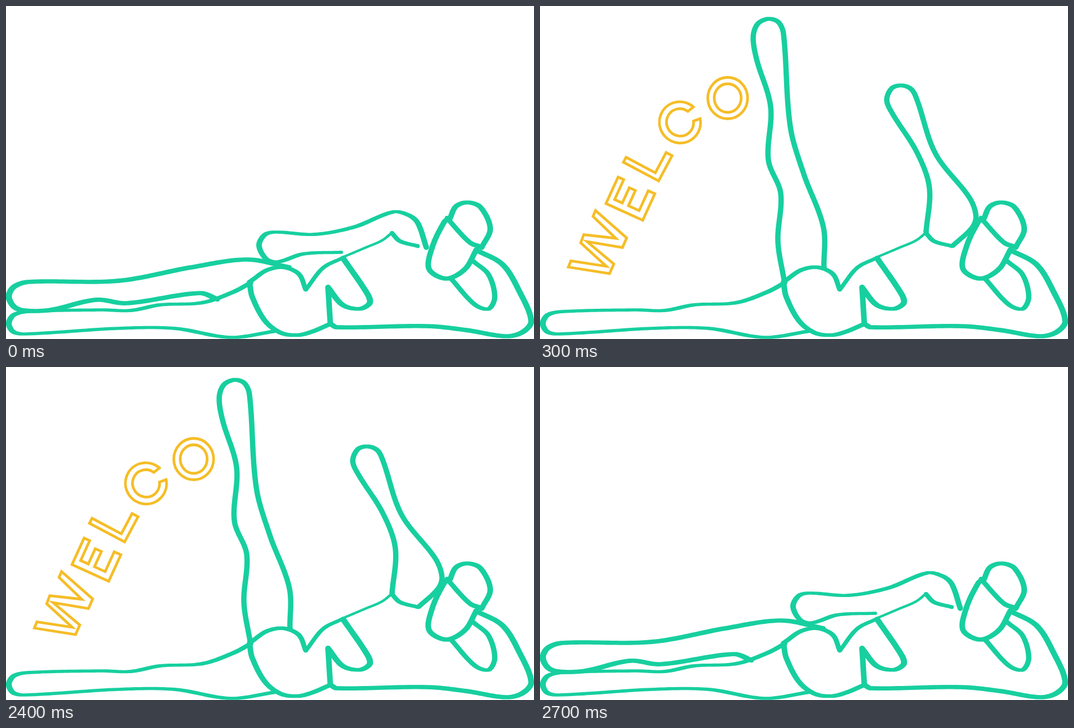
Animation of 941x595 px, one loop 3.7 s. Source, as an HTML page with a canvas:

```html
<!DOCTYPE html>
<html lang="en">
<head>
<meta charset="utf-8">
<title>Welcome</title>
<style>
html, body { margin: 0; width: 100%; height: 100%; overflow: hidden; background: #fff; }
canvas { display: block; }
</style>
</head>
<body>
<canvas id="stage" width="941" height="595" role="img" aria-label="WELCOME!"></canvas>
<script>
const ctx = document.getElementById('stage').getContext('2d');
const GREEN = '#17cf9f', YELLOW = '#f5bd27';

// Smooth curve through a few points, drawn with a flat nib:
// `thin` wide where the line runs level, `thick` where it runs upright.
function brush(thin, thick, text) {
  const points = text.split(' ').map(p => p.split(',').map(Number));
  const at = i => points[Math.max(0, Math.min(points.length - 1, i))];
  const dist = (p, q) => Math.hypot(q[0] - p[0], q[1] - p[1]);
  const tangent = i => {
    const before = at(i - 1), after = at(i + 1);
    const length = dist(before, at(i)) + dist(at(i), after);
    return [0, 1].map(k => (after[k] - before[k]) / length);
  };
  const line = [];
  for (let i = 0; i < points.length - 1; i++) {
    const p = at(i), q = at(i + 1), m = tangent(i), n = tangent(i + 1), length = dist(p, q);
    for (let s = 0; s < 20; s++) {
      const t = s / 20, u = 1 - t;
      line.push([0, 1].map(k =>
        p[k] * u * u * (1 + 2 * t) + q[k] * t * t * (3 - 2 * t) + length * t * u * (m[k] * u - n[k] * t)));
    }
  }
  line.push(at(points.length));

  const left = [], right = [], shape = new Path2D(), ends = new Path2D();
  const last = line.length - 1;
  line.forEach(([x, y], i) => {
    const p = line[Math.max(0, i - 1)], q = line[Math.min(last, i + 1)];
    const angle = Math.atan2(q[1] - p[1], q[0] - p[0]);
    const r = (thin + (thick - thin) * Math.abs(Math.sin(angle))) / 2;
    const dx = -Math.sin(angle) * r, dy = Math.cos(angle) * r;
    left.push([x + dx, y + dy]);
    right.unshift([x - dx, y - dy]);
    if (i === 0 || i === last) {
      ends.moveTo(x + r, y);
      ends.arc(x, y, r, 0, 7);
    }
  });
  left.concat(right).forEach(p => shape.lineTo(...p));
  return [shape, ends];
}

const restingLeg = brush(5.5, 10.5, '437,494 405,511 350,530 275,534 222,544 170,543 40,546 14,552 5,567 13,582 35,586 200,576 300,576 400,592 480,581');
const torso = [
  brush(6.5, 10, '434,494 439,520 462,563 490,584 520,588 545,582 576,569'),
  brush(6.5, 9, '437,491 465,472 495,467 522,479 534,506'),
  brush(5.5, 8, '535,506 565,468 600,450'),
  brush(6.5, 11, '601,451 645,516 648,531 630,541 600,534 574,503'),
  brush(9, 10, '574,503 578,568'),
  brush(7.5, 10.5, '578,568 590,574 750,572 820,579 890,590 920,583 936,563 915,510 885,462 838,436'),
  brush(4, 5, '600,449 640,432 670,419 688,405'),
  brush(6, 9, '688,406 702,420 734,429')
];
const head = [
  brush(7.5, 10, '789,380 781,386 760,430 754,470 785,487 818,470 838,436'),
  brush(8, 9, '786,379 826,422 848,431'),
  brush(7, 10, '791,380 802,358 823,351 846,360 863,398 848,431')
];
const supportingArm = brush(6, 9.5, '793,487 835,533 860,541 871,520 860,480 834,457');
const body = [restingLeg, ...torso, ...head, supportingArm].flat();

// Moving leg and arm, from lying flat to fully raised, with the letters passed so far.
const poses = [
  { shown: 0, strokes: [
    brush(7.5, 11, '505,467 430,453 330,467 200,491 40,493 14,502 5,519 14,537 32,544 80,543 160,525 215,531 345,513 377,524'),
    brush(5.5, 10, '749,431 734,388 718,374 690,368 620,395 550,408 480,404 461,409 451,428 464,452 485,457 530,443 598,440')
  ] },
  { shown: 1, strokes: [
    brush(7, 9.5, '503,467 470,445 330,383 190,294 125,250 98,240 75,247 62,270 75,294 205,368 300,425 345,437 395,470 436,491'),
    brush(6, 9, '750,430 747,380 695,347 600,338 500,312 480,318 470,338 480,358 560,376 655,392 688,404')
  ] },
  { shown: 3, strokes: [
    brush(6, 10, '505,467 440,382 345,312 300,264 215,151 200,140 182,135 163,144 154,163 163,189 245,258 280,295 320,362 355,384 408,470 436,491'),
    brush(6.5, 9, '751,427 754,410 763,382 752,354 690,324 640,309 560,250 546,239 530,234 514,243 508,263 520,286 580,312 625,343'),
    brush(4, 5, '625,343 655,362 688,404')
  ] },
  { shown: 5, strokes: [
    brush(7, 9.5, '506,467 505,395 470,300 446,215 434,50 425,29 407,23 388,32 380,55 386,95 411,180 407,275 429,335 424,420 435,490'),
    brush(7, 9.5, '736,428 770,396 777,375 765,342 705,264 672,168 662,149 645,142 627,147 618,168 628,192 672,262 694,325 688,404')
  ] },
  { shown: 8, strokes: [
    brush(6, 10, '440,490 500,407 548,328 560,287 612,216 627,193 645,130 670,78 688,72 706,79 714,97 685,165 628,262 607,330 575,435 529,480'),
    brush(6, 10, '736,429 758,414 775,385 768,355 738,255 735,165 728,148 712,141 697,144'),
    brush(8, 9.5, '681,171 702,230 708,284'),
    brush(5.5, 7, '707,287 712,325 698,390 688,405')
  ] }
];

const ellipse = (x, y, rx, ry) => `M${x - rx} ${y}a${rx} ${ry} 0 1 0 ${2 * rx} 0a${rx} ${ry} 0 1 0 ${-2 * rx} 0Z`;
const E = 'M0 0H52V11H13V26H43V38H13V59H52V72H0Z';
// Each letter: origin, rotation in degrees, outline.
const letters = [
  [0, 0, 0, 'M50.5 466.5L124 478 131.5 461 84 421 147 431.5 154.5 414.5 99 365.5 94.5 376 135 415 78 408.5 72.5 423 118 465 55 455.5Z'],
  [117.6, 353, -65.5, E],
  [148.7, 279.2, -62, 'M0 0H10V59H51V71H0Z'],
  [249.5, 208, -30, 'M34.5 12A36.5 37 0 1 1 34.5 -12L22 -10A24 24.5 0 1 0 22 10Z'],
  [334.5, 164.5, 0, ellipse(0, 0, 35.5, 37) + ellipse(0, 0, 24, 25.5)],
  [399.5, 101.5, 0, 'M0 0H13L39 35 65 0H78V73H65V26L41 56H37L13 26V73H0Z'],
  [504, 98, -3.5, E],
  [589.5, 157.5, 0, 'M-7.5 -60C-7.5 -69 7.5 -69 7.5 -60L4.5 -16Q0.5 -9 -3.5 -16Z' + ellipse(0, 0, 7.5, 7.5)]
].map(([x, y, degrees, d]) => ({ x, y, angle: degrees * Math.PI / 180, path: new Path2D(d) }));

// Four quick steps up, a long hold, four quick steps down, a rest.
function poseAt(t) {
  const up = Math.floor(t / 100), down = Math.floor((2800 - t) / 100 - 1e-9);
  return poses[Math.max(0, Math.min(4, up, down))];
}

function draw({ shown, strokes }) {
  ctx.fillStyle = '#fff';
  ctx.fillRect(0, 0, 941, 595);
  ctx.strokeStyle = YELLOW;
  ctx.lineWidth = 4.8;
  for (const { x, y, angle, path } of letters.slice(0, shown)) {
    ctx.save();
    ctx.translate(x, y);
    ctx.rotate(angle);
    ctx.stroke(path);
    ctx.restore();
  }
  ctx.fillStyle = GREEN;
  for (const shape of [...body, ...strokes.flat()]) ctx.fill(shape);
}

const start = performance.now();
function tick() {
  draw(poseAt((performance.now() - start) % 3700));
  requestAnimationFrame(tick);
}
tick();
</script>
</body>
</html>
```
